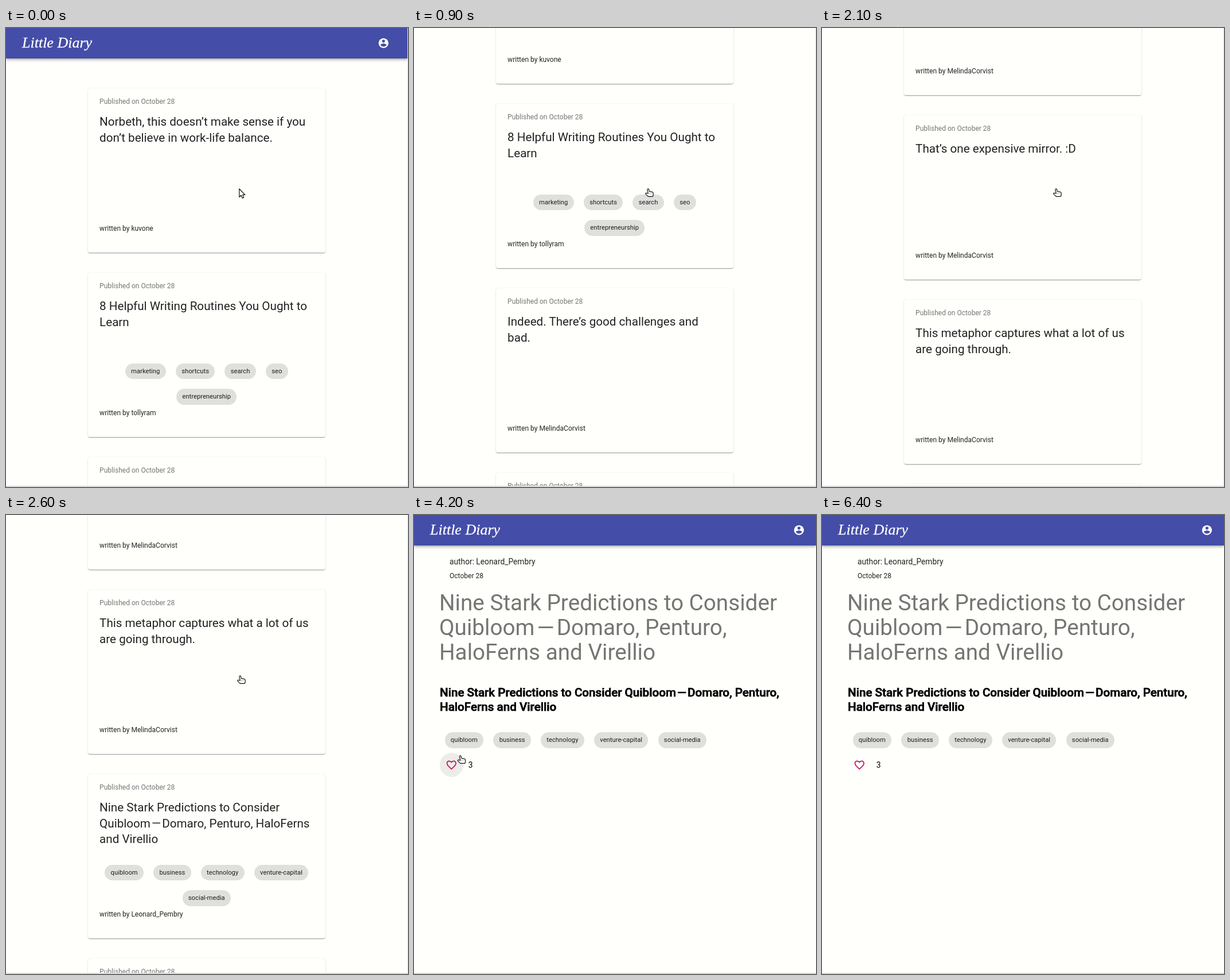
An HTML page for the animation above (6800 ms loop, 701 by 799 pixels).

```html
<!DOCTYPE html>
<html lang="en">
<head>
<meta charset="utf-8">
<title>Little Diary</title>
<style>
  html, body { margin: 0; width: 701px; height: 799px; overflow: hidden; background: #fffffc; }
  body { position: relative; font-family: Roboto, "Open Sans", sans-serif; color: rgba(0,0,0,.87); }
  div, svg, span, h1, h2 { position: absolute; margin: 0; white-space: pre; }
  svg { overflow: visible; }

  #view { inset: 0 0 2px 0; overflow: hidden; }
  #floor { left: 0; top: 797px; width: 701px; height: 1.5px; background: #d9d9d9; }
  #edge { left: 700px; top: 0; width: 1px; height: 797px; background: #e4e4e2; }

  #bar { left: 0; top: 0; width: 700px; height: 53px; background: #444da8;
    box-shadow: 0 2px 3px -1px rgba(0,0,0,.2), 0 3px 4px rgba(0,0,0,.14), 0 1px 9px rgba(0,0,0,.12); }
  #brand { left: 28px; top: 8px; font: italic 26px/36px "Liberation Serif", "Noto Serif", serif; color: #fff;
    -webkit-text-stroke: .3px #fff; }
  #user { left: 648.2px; top: 15.7px; }
  .reading #bar { width: 701px; }
  .reading #user { left: 661.2px; }
  .reading #edge { display: none; }

  #list { inset: 0; }
  .card { left: 142.5px; width: 414.5px; height: 286.3px; border-radius: 3.4px; background: #fffffc;
    box-shadow: 0 2px 1px -1px rgba(0,0,0,.2), 0 1px 1px rgba(0,0,0,.14), 0 0 1px rgba(0,0,0,.16), 0 1px 3px rgba(0,0,0,.12); }
  .card > * { left: 20.6px; }
  .small { font-size: 12.04px; line-height: 18px; }
  .date { top: 14px; color: rgba(0,0,0,.54); }
  .title { top: 45px; font-size: 20.64px; line-height: 27.7px; }
  .by { top: 235px; }
  .chips { display: flex; flex-wrap: wrap; justify-content: center; gap: 17.2px; }
  .card .chips { top: 157.7px; width: 373.3px; }
  .chips span { position: static; padding: 0 10.3px; border-radius: 14px; background: #dfdfdc;
    font-size: 11.25px; line-height: 27.5px; }

  #post { inset: 0; }
  #author { left: 62px; top: 71px; font-size: 13.76px; line-height: 20px; }
  #day { left: 62px; top: 96.5px; }
  h1 { left: 44px; top: 131px; font-size: 38.7px; line-height: 43.2px; font-weight: 400; color: rgba(0,0,0,.54); }
  h2 { left: 45px; top: 297.4px; font-size: 20.64px; line-height: 24.2px; font-weight: 500; color: #000;
    -webkit-text-stroke: .7px #000; }
  #tags { left: 53.5px; top: 378px; flex-wrap: nowrap; }
  #hover, #ripple { left: 44.9px; top: 414.4px; width: 41.2px; height: 41.2px; border-radius: 50%; background: #000; }
  #heart { left: 55.2px; top: 424.7px; }
  #heart path { fill: #c51162; }
  #count { left: 94.8px; top: 425px; font-size: 13.76px; line-height: 20px; color: #000; }

  #cursor { left: 0; top: 0; }
  #cursor path { fill: #fff; stroke: #111; stroke-width: 1.2; stroke-linejoin: round; }
</style>
</head>
<body>
<div id="view">
  <div id="list"></div>
  <div id="post">
    <div id="author">author: Leonard_Pembry</div>
    <div id="day" class="small">October 28</div>
    <h1></h1>
    <h2></h2>
    <div id="tags" class="chips"></div>
    <div id="hover"></div>
    <div id="ripple"></div>
    <svg id="heart" width="20.6" height="20.6" viewBox="0 0 24 24"><path fill-rule="evenodd"/></svg>
    <div id="count">3</div>
  </div>
  <div id="bar">
    <div id="brand">Little Diary</div>
    <svg id="user" width="20.6" height="20.6" viewBox="0 0 24 24">
      <circle cx="12" cy="12" r="10" fill="#fff"/>
      <g fill="#444da8"><circle cx="12" cy="8" r="3"/><path d="M6 16c0-2 4-3.1 6-3.1s6 1.1 6 3.1a7.2 7.2 0 0 1-12 0z"/></g>
    </svg>
  </div>
  <div id="edge"></div>
  <svg id="cursor" width="18" height="19">
    <path id="arrow" d="M.8 1V15.2L4 12.2 6.2 17.2 8.7 16.2 6.6 11.3H10.8Z"/>
    <g id="hand">
      <path d="M3.9 2.2Q4.6 .2 6.2 1.2L7.5 5.6 12.2 6.3Q14.2 6.7 14.2 8.6V11.5L13.2 14.4H5.4L1.2 10.4Q.2 8.6 2 8.2L5.2 9.2Z"/>
      <path d="M7 9.4h.6M9.3 9.4h.6M11.6 9.4h.6" style="stroke-width:1"/>
    </g>
  </svg>
</div>
<div id="floor"></div>

<script>
const $ = id => document.getElementById(id);
const LOOP = 6800, TICK = 100;
const LOADING = 3500, READING = 3800;
const CLICKS = [4600, 5300], LIKED = [4800, 5500], HOVER = [4100, 5800];

const dash = '\u200a—\u200a';
const lead = 'Nine Stark Predictions to Consider';
const mainTags = ['quibloom', 'business', 'technology', 'venture-capital', 'social-media'];
const cards = [
  ['Norbeth, this doesn’t make sense if you\ndon’t believe in work-life balance.', 'kuvone'],
  ['8 Helpful Writing Routines You Ought to\nLearn', 'tollyram',
    ['marketing', 'shortcuts', 'search', 'seo', 'entrepreneurship']],
  ['Indeed. There’s good challenges and\nbad.', 'MelindaCorvist'],
  ['I’m glad to hear it! Smarter than you? I\ndoubt it — just lots of practice at faking.\n;)', 'MelindaCorvist'],
  ['That’s one expensive mirror. :D', 'MelindaCorvist'],
  ['This metaphor captures what a lot of us\nare going through.', 'MelindaCorvist'],
  [`${lead}\nQuibloom${dash}Domaro, Penturo, HaloFerns\nand Virellio`, 'Leonard_Pembry', mainTags],
  ['Build a Quiet Routine For Work', 'ownfirstdrafts',
    ['personal-development', 'personal-growth', 'philosophy', 'life', 'self-improvement']]
];

const chips = tags => tags.map(tag => `<span>${tag}</span>`).join('');
$('list').innerHTML = cards.map(([title, by, tags = []], i) =>
  `<div class="card" style="top:${105 + 321 * i}px"><div class="small date">Published on October 28</div>` +
  `<div class="title">${title}</div><div class="chips">${chips(tags)}</div>` +
  `<div class="small by">written by ${by}</div></div>`).join('');
document.querySelector('h1').textContent = `${lead}\nQuibloom${dash}Domaro, Penturo,\nHaloFerns and Virellio`;
document.querySelector('h2').textContent = `${lead} Quibloom${dash}Domaro, Penturo,\nHaloFerns and Virellio`;
$('tags').innerHTML = chips(mainTags);

const heartFull = 'M16.5 3c-1.74 0-3.41.81-4.5 2.09C10.91 3.81 9.24 3 7.5 3 4.42 3 2 5.42 2 8.5c0 3.78 3.4 6.86 8.55 11.54L12 21.35l1.45-1.32C18.6 15.36 22 12.28 22 8.5 22 5.42 19.58 3 16.5 3z';
const heartLine = heartFull + 'm-4.4 15.55l-.1.1-.1-.1C7.14 14.24 4 11.39 4 8.5 4 6.5 5.5 5 7.5 5c1.54 0 3.04.99 3.57 2.36h1.87C13.46 5.99 14.96 5 16.5 5c2 0 3.5 1.5 3.5 3.5 0 2.89-3.14 5.74-7.9 10.05z';

// [time, scroll offset]
const scrollKeys = [[400, 0], [500, 14], [700, 115], [900, 294], [1100, 540], [1300, 777], [1500, 935],
  [1800, 1068], [2100, 1237], [2400, 1480], [2600, 1580], [2700, 1580], [2800, 1620], [3000, 1785], [3100, 1829]];
// [time, x, y, shape]; the pointer holds each place until the next
const cursorKeys = [[0, 406, 279, 'arrow'], [200, 403, 279, 'hand'], [3500, 406, 279, 'arrow'],
  [3800, 395, 285, 'arrow'], [3900, 305, 330, 'arrow'], [4000, 190, 382, 'arrow'], [4100, 96, 414, 'hand'],
  [4200, 75.5, 418, 'hand'], [4300, 70, 422, 'hand'], [4400, 66, 427, 'hand'], [5700, 69, 419, 'hand'],
  [5800, 72, 405, 'arrow'], [5900, 70, 395, 'arrow'], [6000, 65, 238, 'arrow'], [6200, 52, 118, 'arrow'],
  [6300, 31, 14, 'hand'], [6400, 0, 0, 'none']];

const clamp = v => Math.min(1, Math.max(0, v));
const within = (t, [from, to]) => t >= from && t < to;
const show = (id, on) => { $(id).style.display = on ? '' : 'none'; };

function scrollAt(t) {
  const i = scrollKeys.findIndex(key => key[0] > t);
  if (i === 0) return 0;
  if (i < 0) return scrollKeys[scrollKeys.length - 1][1];
  const [t0, y0] = scrollKeys[i - 1], [t1, y1] = scrollKeys[i];
  return Math.round(y0 + (y1 - y0) * (t - t0) / (t1 - t0));
}

function drawButton(t) {
  const liked = within(t, LIKED);
  document.querySelector('#heart path').setAttribute('d', liked ? heartFull : heartLine);
  $('count').textContent = liked ? 4 : 3;
  $('hover').style.opacity = .075 * clamp((t - HOVER[0] + 100) / 200) * clamp((HOVER[1] + 100 - t) / 200);

  const age = t - (t >= CLICKS[1] ? CLICKS[1] : CLICKS[0]);
  const grow = 1 - (1 - clamp((age + 100) / 500)) ** 2;
  $('ripple').style.transform = `scale(${.9 * grow})`;
  $('ripple').style.opacity = age < 0 ? 0 : .15 * (1 - clamp((age - 150) / 450));
}

function draw(t) {
  const offset = t < LOADING ? scrollAt(t) : 0;
  const shift = `translateY(${-offset}px)`;
  $('list').style.transform = $('bar').style.transform = shift;
  show('list', t < LOADING);
  show('post', t >= READING);
  document.body.classList.toggle('reading', t >= READING);
  drawButton(t);

  const [, x, y, shape] = cursorKeys.filter(key => key[0] <= t).pop();
  $('cursor').style.transform = `translate(${x}px, ${y}px)`;
  show('arrow', shape === 'arrow');
  show('hand', shape === 'hand');
}

let start;
function frame(now) {
  start ??= now;
  const t = (now - start) % LOOP;
  draw(Math.floor(t / TICK) * TICK);
  requestAnimationFrame(frame);
}
draw(0);
requestAnimationFrame(frame);
</script>
</body>
</html>
```
